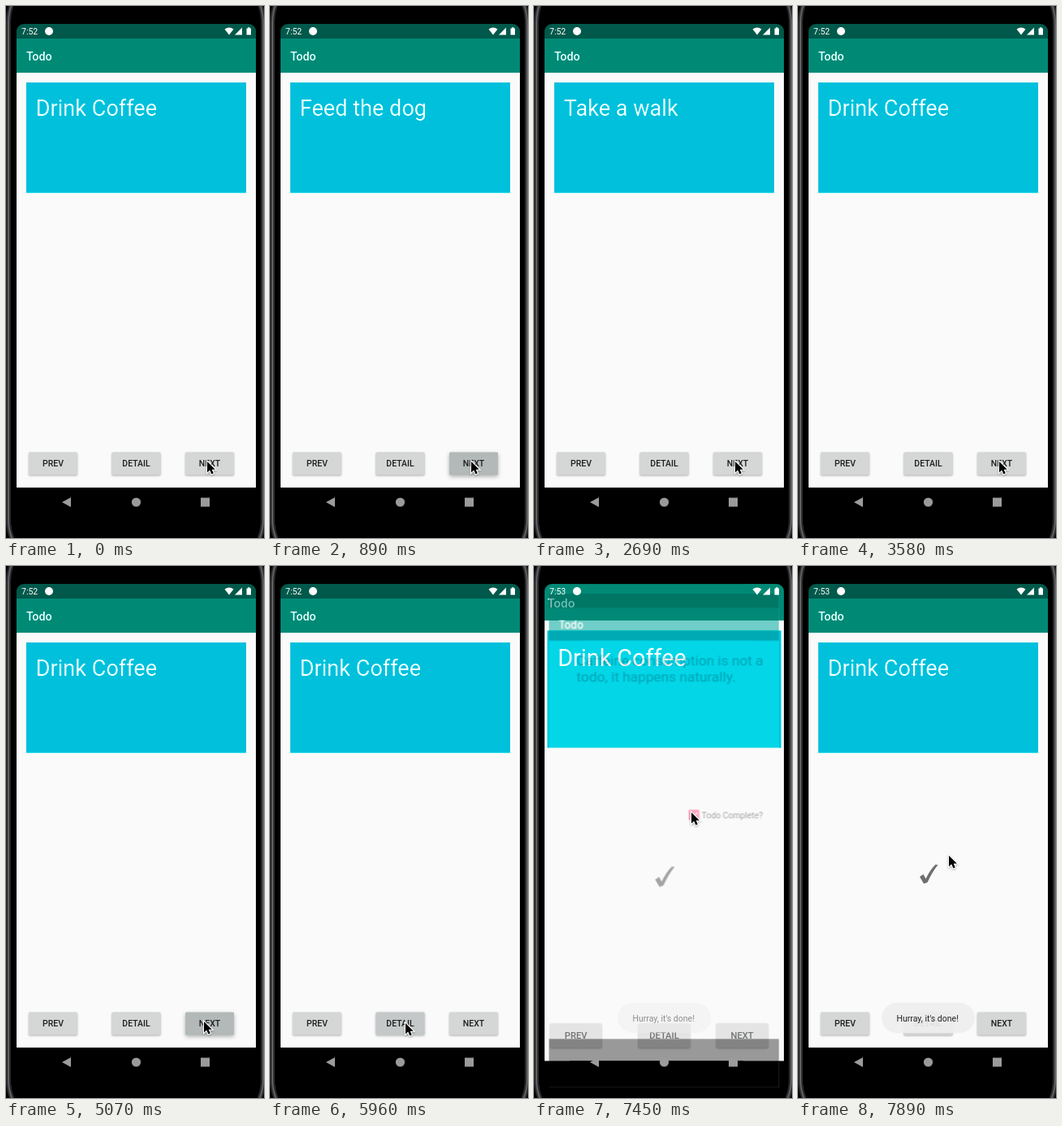
These frames come from a looping animation (318 px wide and 654 px high, 8 s). An HTML page:

```html
<!DOCTYPE html>
<html lang="en">
<head>
<meta charset="utf-8">
<title>Todo</title>
<style>
html, body { margin: 0; width: 100%; height: 100%; overflow: hidden; background: #000; }
svg { display: block; width: 318px; height: 654px; font-family: Roboto, sans-serif; }
#main, #detail { transform-origin: 160.5px 327px; }
.title { font-size: 14.4px; font-weight: 500; fill: #fff; }
.todo { font-size: 27.1px; fill: #fff; }
.button { fill: #d6d7d7; filter: drop-shadow(0 1px 1px rgba(0, 0, 0, .28)); }
.label { font-size: 10.5px; font-weight: 500; fill: #1d1d1d; text-anchor: middle; }
.note { font-size: 18px; fill: #757575; }
.small { font-size: 10.5px; }
#cursor { filter: drop-shadow(0 1px 1px rgba(0, 0, 0, .3)); }
#detail, #check, #ticked, #toast, #late { opacity: 0; }
</style>
</head>
<body>
<svg viewBox="0 0 318 654">
  <defs>
    <clipPath id="screen"><path d="M13 654V31a9 9 0 0 1 9-9H299a9 9 0 0 1 9 9V654Z"/></clipPath>
    <!-- wide-gamut look: cyans lose their red, greys stay -->
    <filter id="vivid" filterUnits="userSpaceOnUse" x="0" y="0" width="318" height="654" color-interpolation-filters="sRGB">
      <feColorMatrix values="1.8 -.8 0 0 0  0 1 0 0 0  0 0 1 0 0  0 0 0 1 0"/>
    </filter>
    <g id="rim" fill="none">
      <path d="M7-2Q3 8 3 22V632Q3 644 8 656" stroke="#29292b" stroke-width="6"/>
      <path d="M7-2Q3 8 3 22V632Q3 644 8 656" stroke="#606165" stroke-width="2"/>
    </g>
    <g id="chrome">
      <rect x="13" y="22" width="295" height="18.5" fill="#00594b"/>
      <rect x="13" y="40" width="295" height="42" fill="#008a76"/>
      <rect x="13" y="82" width="295" height="510" fill="#fafafa"/>
      <rect x="13" y="592" width="295" height="62"/>
      <text class="title" x="25" y="67">Todo</text>
    </g>
  </defs>

  <rect width="318" height="654"/>
  <use href="#rim"/>
  <use href="#rim" transform="translate(320) scale(-1 1)"/>

  <g clip-path="url(#screen)" filter="url(#vivid)">
    <g id="main">
      <use href="#chrome"/>
      <rect x="25" y="94" width="271" height="135.5" fill="#00c0dc"/>
      <g id="todos"></g>
      <rect class="button" x="28" y="548.5" width="60" height="28" rx="1.5"/>
      <rect class="button" id="detailButton" x="130.5" y="548.5" width="60" height="28" rx="1.5"/>
      <rect class="button" id="nextButton" x="221" y="548.5" width="60" height="28" rx="1.5"/>
      <text class="label" x="58" y="566">PREV</text>
      <text class="label" x="160.5" y="566">DETAIL</text>
      <text class="label" x="251" y="566">NEXT</text>
      <path id="check" fill="#6e6e6e" d="M150 382L154.5 379L157.5 384.500Q163 373 169.500 367L172.500 367.500Q166 375 159.500 389L155 390.500Z"/>
    </g>
    <g id="detail">
      <use href="#chrome"/>
      <text class="note" x="48" y="113.3">Caffeine consumption is not a</text>
      <text class="note" x="48" y="134.3">todo, it happens naturally.</text>
      <rect x="192.7" y="299.2" width="12" height="12" rx="1" fill="none" stroke="#737373" stroke-width="1.4"/>
      <g id="ticked">
        <rect x="192" y="298.5" width="13.4" height="13.4" rx="1.5" fill="#e01e63"/>
        <path d="M194.500 305L197.500 308L203 302" fill="none" stroke="#fff" stroke-width="1.4"/>
      </g>
      <text x="208.7" y="309" font-size="10.8" fill="#1d1d1d">Todo Complete?</text>
    </g>
  </g>

  <g fill="#fff">
    <text class="small" id="early" x="19" y="35">7:52</text>
    <text class="small" id="late" x="19" y="35">7:53</text>
    <circle cx="53" cy="31" r="5"/>
    <path d="M269.500 28.500Q275 24.500 280.500 28.500L275 35.500ZM291 26.500V35.500H282ZM296.500 27.500H298V26.300H300.500V27.500H302V35.500H296.500Z"/>
  </g>
  <g fill="#9b9b9b">
    <path d="M69 610L80 604V616Z"/>
    <circle cx="160.5" cy="610" r="5.6"/>
    <rect x="240" y="604.5" width="11" height="11"/>
  </g>
  <g id="toast">
    <rect x="103" y="537" width="115" height="37" rx="18.5" fill="#eee" fill-opacity=".93"/>
    <text class="small" x="121.5" y="559.7" fill="#222">Hurray, it's done!</text>
  </g>
  <path id="cursor" d="M0 0V13.500L3.200 10.600L5.400 15.600L7.800 14.500L5.700 9.700H9.800Z" stroke="#fff" stroke-width="2.2" paint-order="stroke"/>
</svg>

<script>
const LOOP = 8000, TICK = 150;
const $ = id => document.getElementById(id);

// Stops are [time in ms, value]. Values hold, or with glide move on in ticks.
function run(el, prop, stops, glide) {
  const frames = stops.map(([t, v], i) => {
    const next = stops[i + 1] || [LOOP];
    const count = glide ? Math.max(1, Math.round((next[0] - t) / TICK)) : 1;
    return { offset: Math.max(0, t - 4) / LOOP, [prop]: v, easing: `steps(${count}, end)` };
  });
  frames.push({ ...frames[frames.length - 1], offset: 1 });
  el.animate(frames, { duration: LOOP, iterations: Infinity });
}
const appear = (id, t) => run($(id), 'opacity', [[0, 0], [t, 1]]);
const zoom = (id, stops) => run($(id), 'transform', stops.map(([t, s]) => [t, `scale(${s})`]), true);

// Button level: 0 at rest to 1 pressed
function press(id, stops) {
  const grey = n => `rgb(${214 - 33 * n}, ${215 - 30 * n}, ${215 - 31 * n})`;
  const shadow = n => `drop-shadow(0 ${1 + n}px ${1 + 1.5 * n}px rgba(0, 0, 0, .3))`;
  run($(id), 'fill', stops.map(([t, n]) => [t, grey(n)]));
  run($(id), 'filter', stops.map(([t, n]) => [t, shadow(n)]));
}

// Each tap on NEXT shows the following heading one tick later
const taps = [150, 890, 1790, 2390, 3280];
const todos = ['Drink Coffee', 'Feed the dog', 'Plant a tree', 'Wash the car', 'Take a walk', 'Drink Coffee'];
todos.forEach((words, i) => {
  const text = document.createElementNS('http://www.w3.org/2000/svg', 'text');
  text.setAttribute('class', 'todo');
  text.setAttribute('x', 36.8);
  text.setAttribute('y', 135);
  text.textContent = words;
  $('todos').append(text);
  const stops = i ? [[0, 0], [taps[i - 1] + TICK, 1]] : [[0, 1]];
  if (i < taps.length) stops.push([taps[i] + TICK, 0]);
  run(text, 'opacity', stops);
});
const tap = t => [[t, 1], [t + TICK, .5], [t + 2 * TICK, 0]];
press('nextButton', [[0, 0], ...taps.flatMap(tap), [3870, 1], [5220, 0]]);
press('detailButton', [[0, 0], ...tap(5810)]);

// Opening and closing the detail screen
zoom('main', [[0, 1], [5960, 1], [6110, 1.045], [7450, 1.062], [7590, 1.015], [7890, 1]]);
zoom('detail', [[0, .95], [6110, .95], [6260, 1], [7300, 1], [7450, .96]]);
run($('detail'), 'opacity', [[0, 0], [6110, .6], [6260, 1], [7450, .39], [7590, 0]]);

appear('ticked', 7000);
appear('late', 7150);
run($('early'), 'opacity', [[0, 1], [7150, 0]]);
appear('check', 7450);
run($('toast'), 'opacity', [[0, 0], [7300, 0], [7590, 1]], true);

const path = [[0, 248, 560], [4170, 248, 560], [4320, 245, 560], [5070, 244, 560], [5660, 167, 562],
  [6110, 167, 562], [6550, 210, 296], [6850, 194, 303], [7590, 194, 303], [7890, 186, 356]];
run($('cursor'), 'transform', path.map(([t, x, y]) => [t, `translate(${x}px, ${y}px)`]), true);
</script>
</body>
</html>
```
